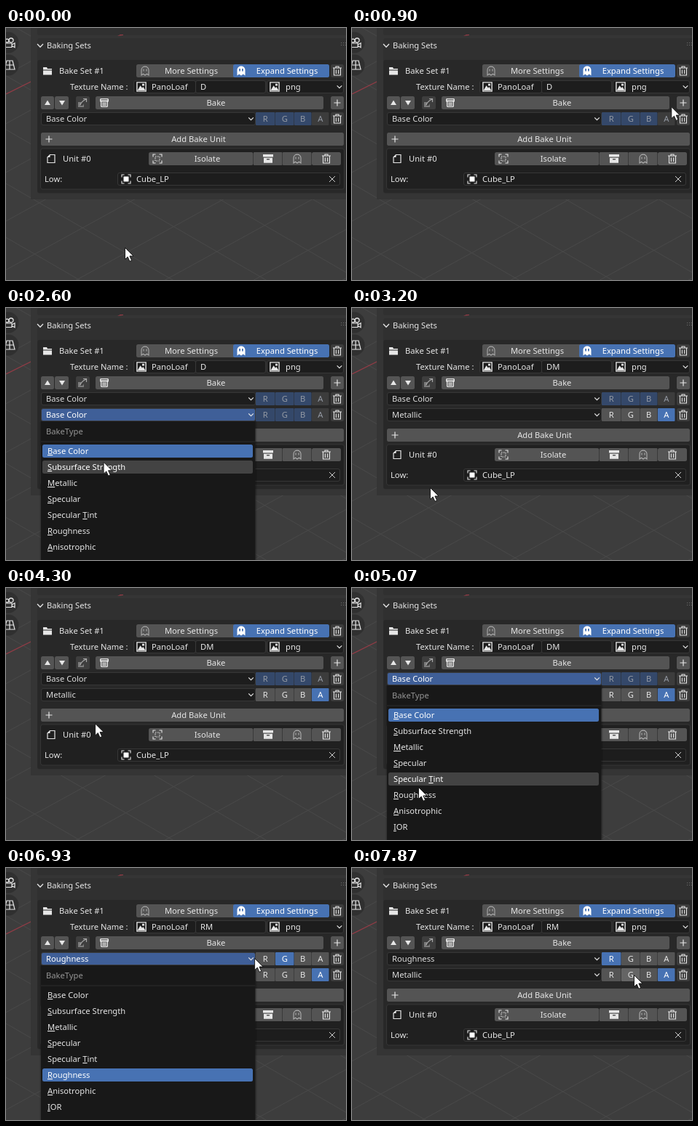
An HTML page that plays this animation: 467x347 px, repeating every 8 s.

```html
<!DOCTYPE html>
<html lang="en">
<head>
<meta charset="utf-8">
<title>Baking sets panel</title>
<style>
html, body { margin: 0; width: 100%; height: 100%; overflow: hidden; background: #3d3d3d; }
svg { display: block; width: 467px; height: 347px; }
text { font: 11.2px "Noto Sans", "Open Sans", sans-serif; white-space: pre; }
</style>
</head>
<body>
<svg id="stage" viewBox="0 0 467 347">
  <g id="back"></g>
  <g id="panel"></g>
  <path id="cursor" d="M.5 .5V16.5L4.2 13.1 6.9 19.3 9.6 18.1 6.9 12H12Z" fill="#fff" stroke="#111" stroke-width=".9"/>
</svg>
<script>
const LOOP = 8000;
const BLUE = '#4772b3', GREY = '#545454', LIGHT = '#656565', DARK = '#1d1d1d', TEXT = '#e6e6e6';
const CELLS = [['R', 343, 26.5], ['G', 370, 25.5], ['B', 396, 23.5], ['A', 420, 23.5]];
// name and index of the underlined letter
const ITEMS = [['Base Color', 0], ['Subsurface Strength', 0], ['Metallic', 0], ['Specular', 0],
  ['Specular Tint', 9], ['Roughness', 0], ['Anisotrophic', 0], ['IOR', 0]];

// cursor keys: time, x, y
const PATH = [
  [0, 163, 302], [30, 163, 302], [420, 262, 226], [830, 430, 115], [870, 433, 112], [970, 452, 98],
  [1130, 452, 98], [1500, 320, 130], [1900, 179, 152], [2400, 179, 152], [2730, 107, 247],
  [3200, 107, 247], [3670, 128, 268], [3900, 128, 268], [4600, 118, 129], [4800, 118, 129],
  [5070, 91, 274], [5200, 90, 282], [5800, 90, 282], [5970, 124, 281], [6600, 303, 143],
  [6780, 318, 127], [6930, 341, 124], [7100, 365, 124], [7300, 365, 124], [7520, 361, 127],
  [7870, 387, 147], [8000, 387, 147]
];
// open time, close time, row
const MENUS = [[2030, 3200, 1], [4650, 5600, 0], [6800, 7300, 0]];

const $ = id => document.getElementById(id);
const box = (x, y, w, h, fill, r = 2.5, extra = '') =>
  `<rect x="${x}" y="${y}" width="${w}" height="${h}" rx="${r}" fill="${fill}" ${extra}/>`;
const field = (x, y, w, color = DARK) =>
  box(x + .5, y + .5, w - 1, 17, color, 2.5, 'stroke="#3a3a3a" stroke-width=".9"');
const text = (x, y, s, fill = TEXT, anchor = 'start') =>
  `<text x="${x}" y="${y + 4}" fill="${fill}" text-anchor="${anchor}">${s}</text>`;
const line = (d, color = TEXT, w = 1.2, extra = '') =>
  `<path d="${d}" fill="none" stroke="${color}" stroke-width="${w}" ${extra}/>`;
const fill = (d, color = TEXT) => `<path d="${d}" fill="${color}" fill-rule="evenodd"/>`;
const at = (x, y, s) => `<g transform="translate(${x} ${y})">${s}</g>`;

const icon = {
  arrow: () => line('M-4-2 0 2.2 4-2', TEXT, 1.3),
  chevron: () => line('M-3.3-1.6 0 1.7 3.3-1.6'),
  plus: () => line('M-4.5 0H4.5M0-4.5V4.5'),
  cross: () => line('M-4-4 4 4M4-4-4 4', '#d0d0d0', 1),
  trash: () => line('M-6-4H6M-2-4V-6H2V-4M-4.5-3.5V6H4.5V-3.5M-1.6-1.5V4M1.6-1.5V4', TEXT, 1.1),
  ghost: c => line('M-5 6V-1C-5-7.5 5-7.5 5-1V6L2.5 4.2 0 6-2.5 4.2ZM-2-2.5V.5M2-2.5V.5', c, 1.1),
  spook: () => fill('M-5.5 6.5V-1C-5.5-8.5 5.5-8.5 5.5-1V6.5L2.8 4.5 0 6.5-2.8 4.5ZM-2.8-3V.5H-1V-3ZM1-3V.5H2.8V-3Z', '#fff'),
  folder: () => fill('M-6-5H-1L0-3H6V-1.5H-6ZM-6-.5H6V5.5H-6Z'),
  image: () => fill('M-6.8-6.8H6.8V6.8H-6.8ZM-5.4-5.4V5.4H5.4V-5.4Z') + fill('M-5.4 5-1.5-1.8 1 1.5 2.5 0 5.4 5ZM1-4.2H4V-1.5H1Z'),
  render: () => fill('M-5-6H5L6-5V-1.5H5V5L4 6H-4L-5 5V-1.5H-6V-5ZM-4.5-4.8V-3.6H4.5V-4.8ZM-3.7-1.5V4.8H3.7V-1.5Z') + fill('M-2.8-.3H2.8V1.2H-2.8ZM-2.8 2.2H2.8V3.8H-2.8Z'),
  link: () => fill('M-6-1H-1.5L-3 4H0L2 1.5V6H-6Z', '#7c7c7c') + line('M-3 3C-2-1 1-3 5-5M1-5.5H5.5V-1', '#a8a8a8', 1.2),
  sheet: () => line('M-1.5-5.5H5V5.5H-5V-2Z') + fill('M-1.5-6V-2H-5.5Z'),
  frame: () => line('M-6-2.5V-6H-2.5M2.5-6H6V-2.5M6 2.5V6H2.5M-2.5 6H-6V2.5', TEXT, 1.1),
  dots: () => icon.frame() + line('M-3-3H3V3H-3Z', TEXT, 1.1, 'stroke-dasharray="1.5 1.5"'),
  archive: () => fill('M-7-6H7V-2.5H-7ZM-6-1.2H6V5.8H-6ZM-2 0V1.5H2V0Z'),
  up: () => fill('M-4 3 0-3.5 4 3Z'),
  down: () => fill('M-4-3 0 3.5 4-3Z'),
  camera: () => line('M-6 1H3V6.5H-6ZM3 3 7 .8V6.8L3 4.5Z') +
    '<g fill="none" stroke="#e6e6e6" stroke-width="1.3"><circle cx="-3.5" cy="-2.5" r="2.4"/><circle cx="2" cy="-3" r="3"/></g>',
  grid: () => line('M-4-6H4L7 6H-7ZM-6 0H6M0-6V6')
};

function drawBack() {
  let s = box(0, 0, 467, 347, '#3d3d3d', 0);
  for (let i = -4; i < 9; i++) {
    const a = 60 + i * 122, b = 20 + i * 128;
    s += line(`M${a - 700} ${300 + 385}L${a + 700} ${300 - 385}M${b - 700} ${300 - 406}L${b + 700} ${300 + 406}`, '#494949', 1);
  }
  s += line('M0 91 36 73', '#943b46', 1.3);
  for (const y of [20, 51]) s += `<circle cx="3" cy="${y}" r="14.5" fill="#303030"/>`;
  $('back').innerHTML = s + at(5, 20, icon.camera()) + at(5, 51, icon.grid());
}

function cursorAt(t) {
  const i = Math.max(1, PATH.findIndex(k => k[0] > t));
  const [t0, x0, y0] = PATH[i - 1], [t1, x1, y1] = PATH[i];
  const u = (t - t0) / (t1 - t0), e = u * .6 + u * u * (3 - 2 * u) * .4;
  return [x0 + (x1 - x0) * e, y0 + (y1 - y0) * e];
}

function stateAt(t) {
  const rows = [t < 5600 ? ['Base Color', ''] : ['Roughness', t < 7430 ? 'G' : 'R']];
  if (t >= 1130) rows.push(t < 3200 ? ['Base Color', ''] : ['Metallic', 'A']);
  const menu = MENUS.find(m => t >= m[0] && t < m[1]);
  return { rows, open: menu ? menu[2] : -1, suffix: t < 3200 ? 'D' : t < 5600 ? 'DM' : 'RM' };
}

function drawPanel({ rows, open, suffix }, mx, my) {
  const over = (x, y, w, h) => open < 0 && mx >= x && mx < x + w && my >= y && my < y + h;
  const button = (x, y, w, r) => box(x, y, w, 18, over(x, y, w, 18) ? LIGHT : GREY, r);
  const dy = rows.length * 22 - 22;

  let s = box(34, 0, 433, 236 + dy, '#353535', 0);
  s += box(43, 0, 430, 10, '#303030', 3) + fill('M153 11 157 9H161V10Z', '#943b46');
  s += box(43, 14, 430, 214 + dy, '#303030', 4) + box(43, 44, 430, 183 + dy, '#282828', 3);
  s += at(47, 24, icon.arrow()) + text(56, 24, 'Baking Sets');
  s += line('M460 20.5H467M460 23.5H467', '#6a6a6a', 1.2, 'stroke-dasharray="1.2 1.8"');

  s += at(57, 59, icon.folder()) + text(73, 59, 'Bake Set #1');
  s += box(179, 50, 136, 18, GREY) + at(191, 59, icon.ghost('#aaa')) + text(254.5, 59, 'More Settings', TEXT, 'middle');
  s += box(312, 50, 132, 18, BLUE) + at(323, 59, icon.spook()) + text(386, 59, 'Expand Settings', '#fff', 'middle');
  s += box(446, 50, 18, 18, '#3c3c3c') + at(455, 59, icon.trash());

  s += text(88, 81, 'Texture Name :');
  s += field(175, 72, 86) + at(186, 81, icon.image()) + text(200, 81, 'PanoLoaf');
  s += field(260, 72, 97) + text(267, 81, suffix);
  s += field(358, 72, 106) + at(369, 81, icon.image()) + text(384, 81, 'png') + at(458, 81, icon.chevron());

  s += button(48, 94, 18) + at(57, 103, icon.up()) + button(67, 94, 19) + at(77, 103, icon.down());
  s += box(96, 94, 19, 18, '#3e3e3e') + at(105, 103, icon.link());
  s += button(123, 94, 313) + at(135, 103, icon.render()) + text(288.5, 103, 'Bake', TEXT, 'middle');
  s += button(446, 94, 18) + at(455, 103, icon.plus());

  rows.forEach(([name, on], i) => {
    const y = 116 + i * 22, mid = y + 9, isOpen = open === i;
    const hot = over(48, y, 294, 18);
    s += field(48, y, 295, isOpen ? '#3f5f98' : hot ? '#232323' : DARK);
    s += text(55, mid, name, hot || isOpen ? '#fff' : '#dcdcdc') + at(336.5, mid, icon.chevron());
    for (const [c, x, w] of CELLS) {
      const off = !on, lit = off ? c !== 'A' : c === on;
      const color = off ? (lit ? '#34486a' : '#3c3c3c') : lit ? BLUE : over(x, y, w, 18) ? LIGHT : GREY;
      s += box(x, y, w, 18, color, 1) + text(x + w / 2, mid, c, off ? '#949aa4' : lit ? '#fff' : TEXT, 'middle');
    }
    s += box(446, y, 18, 18, over(446, y, 18, 18) ? LIGHT : '#3c3c3c') + at(455, mid, icon.trash());
  });

  const y = 144 + dy;
  s += button(48, y, 416) + at(59, y + 9, icon.plus()) + text(264.5, y + 9, 'Add Bake Unit', TEXT, 'middle');

  const u = y + 36, low = u + 28;
  s += box(47.5, u - 14, 417, 56, '#202020', 3, 'stroke="#3a3a3a" stroke-width=".8"');
  s += at(62, u, icon.sheet()) + text(78, u, 'Unit #0');
  s += button(196, u - 9, 143.5) + at(208, u, icon.dots()) + text(276.5, u, 'Isolate', TEXT, 'middle');
  s += button(340, u - 9, 39.5, 1) + at(360, u, icon.archive());
  s += button(380, u - 9, 39.5, 1) + at(400, u, icon.ghost('#b0b0b0'));
  s += button(420, u - 9, 40) + at(440, u, icon.trash());
  s += text(53, low, 'Low:');
  s += field(153, low - 9, 306) + at(165, low, icon.frame() + fill('M-3.5-3.5H3.5V3.5H-3.5Z', '#fff'));
  s += text(179, low, 'Cube_LP', over(153, low - 9, 306, 18) ? '#fff' : TEXT) + at(448, low, icon.cross());

  if (open >= 0) s += drawMenu(open * 22, rows[open][0], mx, my);
  return s;
}

function drawMenu(dy, chosen, mx, my) {
  let s = box(46.5, 134 + dy, 298, 230, 'rgba(0,0,0,.18)', 2) + box(48, 134 + dy, 294.5, 230, '#181818', 0);
  s += text(55, 148 + dy, 'BakeType', '#959595') + box(48, 161.5 + dy, 294.5, 1, '#2c2c2c', 0);
  ITEMS.forEach(([name, k], i) => {
    const y = 175 + dy + i * 22;
    const hot = mx > 50 && mx < 339 && my > y - 8 && my < y + 14;
    if (name === chosen || hot) s += box(50, y - 9, 289, 18, name === chosen ? BLUE : '#434343');
    const label = `${name.slice(0, k)}<tspan text-decoration="underline">${name[k]}</tspan>${name.slice(k + 1)}`;
    s += text(57, y, label, name === chosen || hot ? '#fff' : TEXT);
  });
  return s;
}

let last = '';
function update(t) {
  const [x, y] = cursorAt(t);
  const html = drawPanel(stateAt(t), x, y);
  if (html !== last) $('panel').innerHTML = last = html;
  $('cursor').setAttribute('transform', `translate(${x.toFixed(1)} ${y.toFixed(1)})`);
}

drawBack();
const start = performance.now();
function tick() {
  update((performance.now() - start) % LOOP);
  requestAnimationFrame(tick);
}
update(0);
requestAnimationFrame(tick);
</script>
</body>
</html>
```
